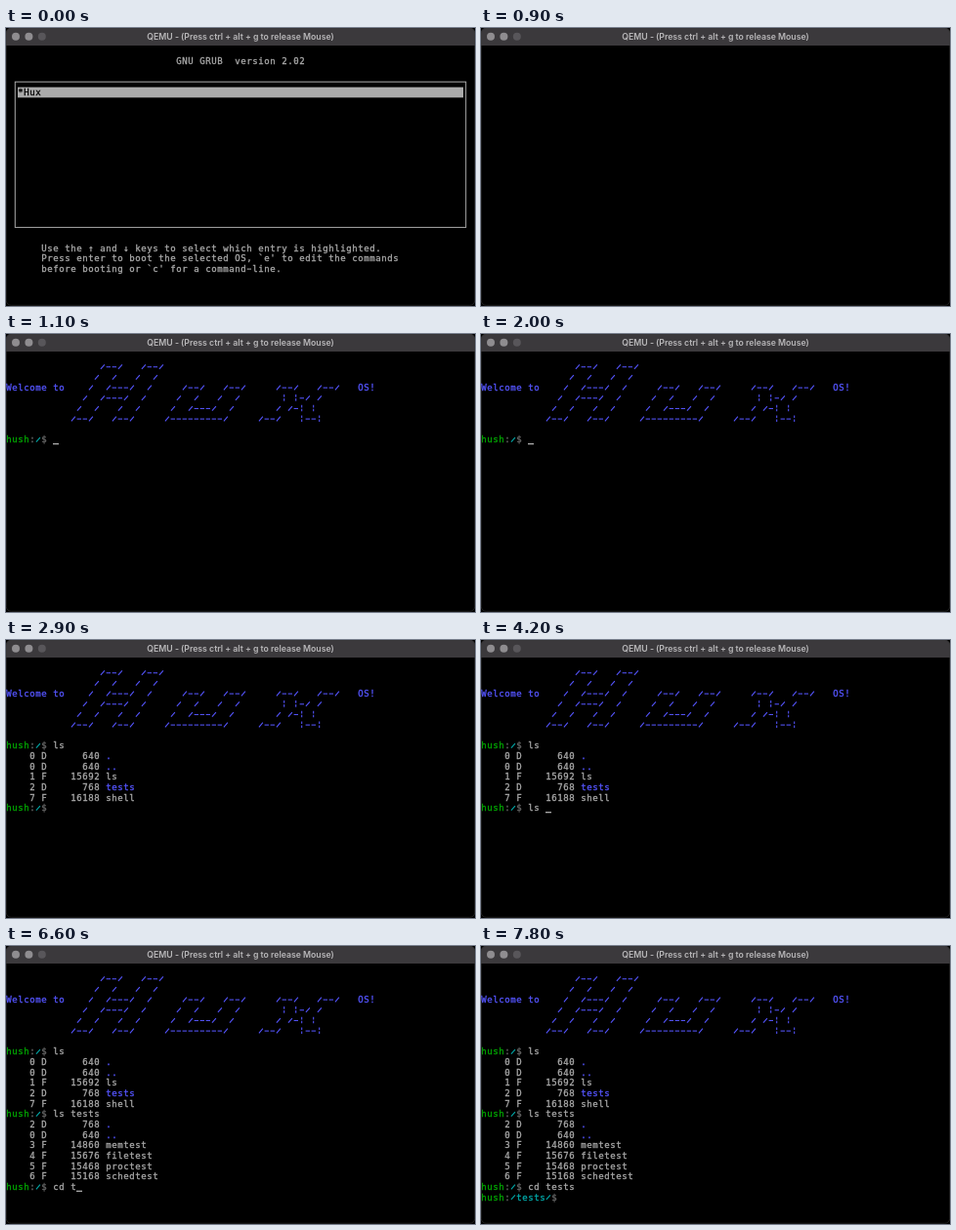
Write an HTML page with a canvas that moves like this. It is 480 by 285 pixels and loops after 8 s.

```html
<!DOCTYPE html>
<html lang="en">
<head>
<meta charset="utf-8">
<title>Hux in QEMU</title>
<style>
  html, body { margin: 0; width: 100%; height: 100%; overflow: hidden; background: #000; }
  canvas { display: block; width: 480px; height: 285px; }
</style>
</head>
<body>
<canvas id="stage"></canvas>
<script>
const LOOP = 8000, STEP = 100;
const BAR = 18, CW = 6, CH = 32 / 3;
const canvas = document.getElementById('stage');
const ctx = canvas.getContext('2d');
const dpr = window.devicePixelRatio || 1;
canvas.width = 480 * dpr;
canvas.height = 285 * dpr;
ctx.scale(dpr, dpr);

// ^x inside a line switches to colour x
const COLORS = {
  w: '#aaaaaa', k: '#000000', d: '#666666', g: '#00aa00',
  n: '#0000aa', c: '#00aaaa', b: '#5555ff'
};

const rowTop = row => BAR + row * CH;

// Console glyphs that differ from the text font: line segments in cell units
const STROKES = {
  '/': [[0.9, 7.3, 4.9, 2.7]],
  '-': [[0.6, 5.1, 5, 5.1]],
  '¦': [[2.7, 1.4, 2.7, 4.1], [2.7, 5.4, 2.7, 8]]
};

function glyph(ch, x, y) {
  if (STROKES[ch]) {
    ctx.lineWidth = 1.05;
    ctx.beginPath();
    for (const [x1, y1, x2, y2] of STROKES[ch]) {
      ctx.moveTo(x + x1, y + y1);
      ctx.lineTo(x + x2, y + y2);
    }
    ctx.stroke();
    return;
  }
  ctx.lineWidth = 0.3;
  ctx.fillText(ch, x + 2.85, y + 8);
  ctx.strokeText(ch, x + 2.85, y + 8);
}

function printLine(row, line, col = 0) {
  ctx.font = '9px "DejaVu Sans Mono", monospace';
  ctx.textAlign = 'center';
  ctx.textBaseline = 'alphabetic';
  let color = COLORS.w;
  for (let i = 0; i < line.length; i++) {
    if (line[i] === '^') { color = COLORS[line[++i]]; continue; }
    if (line[i] !== ' ') {
      ctx.fillStyle = ctx.strokeStyle = color;
      glyph(line[i], col * CW, rowTop(row));
    }
    col++;
  }
}

function drawWindow() {
  ctx.fillStyle = '#000';
  ctx.fillRect(0, 0, 480, 285);
  ctx.fillStyle = '#3b393c';
  ctx.beginPath();
  ctx.roundRect(0, 0, 480, BAR, [5, 5, 0, 0]);
  ctx.fill();
  [10, 23.4, 36.8].forEach((x, i) => {
    ctx.fillStyle = i < 2 ? '#8f8d90' : '#58565a';
    ctx.beginPath();
    ctx.arc(x, 8.8, 4, 0, Math.PI * 2);
    ctx.fill();
  });
  ctx.font = '600 8.7px Inter, sans-serif';
  ctx.textAlign = 'center';
  ctx.textBaseline = 'alphabetic';
  ctx.fillStyle = '#b9b8ba';
  ctx.fillText('QEMU - (Press ctrl + alt + g to release Mouse)', 240, 12);
  ctx.strokeStyle = '#333';
  ctx.lineWidth = 0.6;
  ctx.beginPath();
  ctx.roundRect(0.3, 0.3, 479.4, 284, 5);
  ctx.stroke();
}

function drawMenu() {
  printLine(1, 'GNU GRUB  version 2.02', 29);
  ctx.strokeStyle = COLORS.w;
  ctx.lineWidth = 1;
  ctx.strokeRect(9.3, 55.2, 461.4, 149.2);
  ctx.fillStyle = COLORS.w;
  ctx.fillRect(12, rowTop(4), 456, CH);
  printLine(4, '^k*Hux', 2);
  printLine(19, 'Use the ↑ and ↓ keys to select which entry is highlighted.', 6);
  printLine(20, 'Press enter to boot the selected OS, `e\' to edit the commands', 6);
  printLine(21, 'before booting or `c\' for a command-line.', 6);
}

const initLine = text => `[^nINIT^w] ${text}... ^gOK`;
const BOOT = [
  initLine('setting up VGA terminal display'),
  initLine('initializing debugging utilities'),
  initLine('setting up global descriptor table (GDT)'),
  initLine('setting up interrupt descriptor table (IDT)'),
  initLine('kicking off the PIT timer & interrupts'),
  '^cINFO: timer frequency is set to 100Hz',
  initLine('initializing PS/2 keybaord support'),
  initLine('setting up virtual memory using paging')
];

const BANNER = [
  '                /--/   /--/',
  '               /  /   /  /',
  'Welcome to    /  /---/  /     /--/   /--/     /--/   /--/   OS!',
  '             /  /---/  /     /  /   /  /       ¦ ¦-/ /',
  '            /  /   /  /     /  /---/  /       / /-¦ ¦',
  '           /--/   /--/     /---------/     /--/   ¦--¦'
];

const entry = (id, type, size, name) =>
  `    ${id} ${type}${String(size).padStart(9)} ${type === 'D' ? '^b' : ''}${name}`;

// Each command: directory, text, key times, time of enter, output
const SESSION = [
  { dir: '/', text: 'ls', keys: [2400, 2600], enter: 2800, out: [
    entry(0, 'D', 640, '.'), entry(0, 'D', 640, '..'), entry(1, 'F', 15692, 'ls'),
    entry(2, 'D', 768, 'tests'), entry(7, 'F', 16188, 'shell')
  ] },
  { dir: '/', text: 'ls tests', keys: [3900, 4100, 4200, 4400, 4500, 4600, 4700, 4800], enter: 5400, out: [
    entry(2, 'D', 768, '.'), entry(0, 'D', 640, '..'), entry(3, 'F', 14860, 'memtest'),
    entry(4, 'F', 15676, 'filetest'), entry(5, 'F', 15468, 'proctest'), entry(6, 'F', 15168, 'schedtest')
  ] },
  { dir: '/', text: 'cd tests', keys: [5900, 6100, 6200, 6600, 6900, 7000, 7100, 7200], enter: 7500, out: [] },
  { dir: '/tests/', text: '', keys: [], enter: Infinity, out: [] }
];

const cursorOn = t => Math.floor((t - 1450) / 273.5) % 2 === 0;

function drawShell(t) {
  BANNER.forEach((line, i) => printLine(i + 1, '^b' + line));
  let row = 8;
  for (const { dir, text, keys, enter, out } of SESSION) {
    const typed = text.slice(0, keys.filter(k => k <= t).length);
    printLine(row, `^ghush^d:^c${dir}^d$ ^w${typed}`);
    if (t < enter) {
      if (cursorOn(t)) {
        ctx.fillStyle = COLORS.w;
        ctx.fillRect((7 + dir.length + typed.length) * CW, rowTop(row) + 8.67, CW, 1.33);
      }
      return;
    }
    row++;
    for (const line of out) printLine(row++, line);
  }
}

function draw(t) {
  drawWindow();
  if (t < 900) drawMenu();
  else if (t >= 1100) drawShell(t);
  else if (t >= 1000) BOOT.forEach((line, i) => printLine(i, line));
}

const startTime = performance.now();
let shown = -1;
function tick() {
  const t = Math.floor(((performance.now() - startTime) % LOOP) / STEP) * STEP;
  if (t !== shown) draw(shown = t);
  requestAnimationFrame(tick);
}
tick();
</script>
</body>
</html>
```
